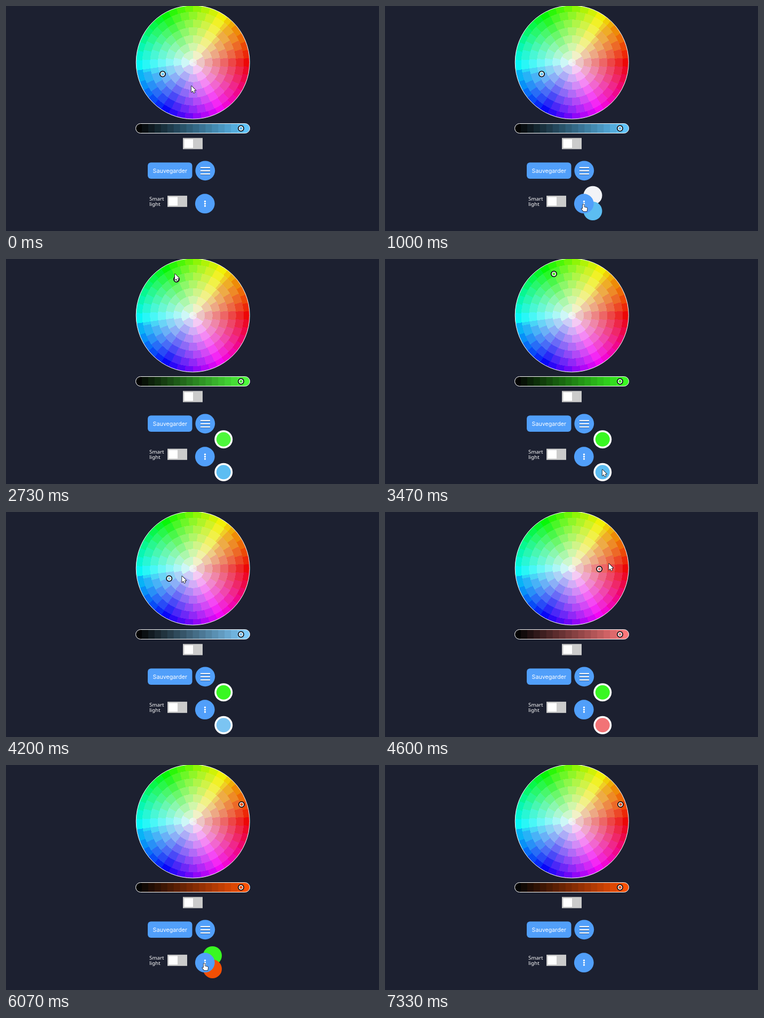
Recreate the animation shown at these times as an HTML page with a canvas. Size 700 by 422 pixels, loop 7390 ms.

```html
<!DOCTYPE html>
<html lang="fr">
<head>
<meta charset="utf-8">
<title>Color picker</title>
<style>
html, body { margin: 0; width: 100%; height: 100%; overflow: hidden; background: #1c2030; }
canvas { display: block; }
</style>
</head>
<body>
<canvas id="stage" width="700" height="422"></canvas>
<script>
const LOOP = 7390;
const ctx = document.getElementById('stage').getContext('2d');
const BLUE = '#519ffa';
const CX = 350.7, CY = 105.5, R = 106.5;
const OPEN_AT = 880, CLOSE_AT = 5930, LAG = 100;

// Pointer path: time, x, y, linear segment up to this point
const PATH = [
  [0, 348, 150], [80, 348, 150], [680, 372, 372], [1500, 373, 372],
  [1800, 385, 310], [2010, 407, 338], [2230, 407, 338], [2450, 350, 105],
  [2630, 320, 38, 1], [2720, 317, 28, 1], [2860, 317, 28], [3200, 408, 395],
  [3700, 408, 395], [4050, 294, 127], [4500, 402, 107, 1], [4600, 420, 97, 1],
  [4800, 442, 74, 1], [5150, 442, 74], [5850, 372, 372], [6450, 372, 372],
  [7220, 543, 424]
];

const clamp = (v, a, b) => Math.min(b, Math.max(a, v));
const smooth = u => u * u * (3 - 2 * u);

function pointer(t) {
  const i = PATH.findIndex(p => p[0] > t);
  if (i < 0) return PATH[PATH.length - 1].slice(1, 3);
  const a = PATH[i - 1], b = PATH[i];
  let u = (t - a[0]) / (b[0] - a[0]);
  if (!b[3]) u = smooth(u);
  return [a[1] + (b[1] - a[1]) * u, a[2] + (b[2] - a[2]) * u];
}

function hsv(h, s, v) {
  const channel = n => {
    const k = (n + h / 60 + 12) % 6;
    return Math.round(255 * v * (1 - s * clamp(Math.min(k, 4 - k), 0, 1)));
  };
  return [channel(5), channel(3), channel(1)];
}

const css = c => `rgb(${c.join()})`;

function colorAt([x, y], v) {
  const dx = x - CX, dy = CY - y;
  const hue = (Math.atan2(dy, dx) * 180 / Math.PI + 360) % 360;
  return hsv(hue, Math.min(1, Math.hypot(dx, dy) / 98), v);
}

// Wheel made of rings, each ring holding six more cells than the one inside
function makeWheel() {
  const c = document.createElement('canvas');
  c.width = c.height = 216;
  const g = c.getContext('2d');
  const img = g.createImageData(216, 216);
  const edge = (h, at) => {
    const d = h - at;
    return 5 * Math.sign(d) * Math.exp(-Math.abs(d) / 10);
  };
  for (let y = 0; y < 216; y++) {
    for (let x = 0; x < 216; x++) {
      const dx = x - 107.5, dy = 107.5 - y;
      const ring = Math.min(7, Math.round(Math.hypot(dx, dy) / 107 * 7.3));
      let h = (Math.atan2(dy, dx) * 180 / Math.PI + 360) % 360;
      h += edge(h, 47) + edge(h, 188);
      const step = 60 / Math.max(1, ring);
      h = Math.round(h / step) * step % 360;
      const v = 0.97 - 0.04 * Math.max(0, Math.cos((h - 10) * Math.PI / 180));
      const rgb = hsv(h, 0.04 + 0.93 * ring / 7, v);
      img.data.set([...rgb, 255], (y * 216 + x) * 4);
    }
  }
  g.putImageData(img, 0, 0);
  return c;
}
const wheel = makeWheel();

function disc(x, y, r, fill) {
  ctx.beginPath();
  ctx.arc(x, y, r, 0, Math.PI * 2);
  ctx.fillStyle = fill;
  ctx.fill();
}

function ring(x, y, r, width, color) {
  ctx.beginPath();
  ctx.arc(x, y, r, 0, Math.PI * 2);
  ctx.lineWidth = width;
  ctx.strokeStyle = color;
  ctx.stroke();
}

function rect(x, y, w, h, fill) {
  ctx.fillStyle = fill;
  ctx.fillRect(x, y, w, h);
}

function round(x, y, w, h, r) {
  ctx.beginPath();
  ctx.roundRect(x, y, w, h, r);
}

function text(s, x, y, font, align) {
  ctx.font = font;
  ctx.textAlign = align;
  ctx.fillStyle = '#fff';
  ctx.fillText(s, x, y);
}

function handle(x, y) {
  ring(x, y, 5, 2, '#0b0d12');
  ring(x, y, 3.5, 1.5, '#fff');
}

function toggle(x, y) {
  rect(x, y, 37, 21, '#cbcbcb');
  rect(x + 2.5, y + 2.5, 16.5, 16, '#fff');
}

function drawWheel(pos) {
  ctx.save();
  ctx.beginPath();
  ctx.arc(CX, CY, R, 0, Math.PI * 2);
  ctx.clip();
  ctx.drawImage(wheel, Math.round(CX - 108), Math.round(CY - 108));
  ctx.restore();
  ring(CX, CY, R, 1, '#fff');
  handle(...pos);
}

function drawSlider(pos) {
  const full = colorAt(pos, 1);
  const bands = 18, w = 215 / bands;
  ctx.save();
  round(243.5, 220.5, 214, 18, 9);
  ctx.clip();
  for (let i = 0; i < bands; i++) {
    const k = i / (bands - 1);
    rect(243 + i * w, 220, w + 1, 19, css(full.map(c => Math.round(c * k * 0.98 + 4 * (1 - k)))));
  }
  ctx.restore();
  round(243.5, 220.5, 214, 18, 9);
  ctx.lineWidth = 1;
  ctx.strokeStyle = '#fff';
  ctx.stroke();
  handle(441, 229.5);
}

function drawOption(dx, dy, p, color) {
  if (p <= 0) return;
  const x = 373.3 + dx * p, y = 370.7 + dy * p;
  const border = 3.5 * clamp(p * 2 - 1, 0, 1);
  const r = 18 - p;
  if (border > 0) disc(x, y, r, '#fff');
  disc(x, y, r - border, color);
}

function drawButtons() {
  round(266, 293.5, 83.5, 30.5, 6);
  ctx.fillStyle = BLUE;
  ctx.fill();
  text('Sauvegarder', 307.8, 313, '10.7px Inter, sans-serif', 'center');
  disc(373.8, 308.8, 18.4, BLUE);
  for (const y of [302, 308, 314]) {
    rect(365, y + 1.6, 18, 1.4, '#2c5f9e');
    rect(365, y, 18, 2, '#fff');
  }
  text('Smart', 269, 365, '9.8px "Noto Sans", sans-serif', 'left');
  text('light', 269, 374.5, '9.8px "Noto Sans", sans-serif', 'left');
}

function drawMenu() {
  disc(373.3, 370.7, 18.4, BLUE);
  for (const y of [366.5, 370.7, 375]) disc(373.5, y, 1.7, '#fff');
}

const ARROW = new Path2D('M0 0V11.5L2.7 9L4.4 13L6.4 12.1L4.7 8.3H8.2Z');
const HAND = new Path2D('M-1.2 1Q0 -.8 1.2 1V5L6 6.2Q7.4 6.8 7.2 8.3L6.3 13H0L-3.6 8.6Q-3.6 7 -1.2 8.2Z');

function drawPointer(t) {
  if (t > 7230) return;
  const [x, y] = pointer(t);
  const overMenu = Math.hypot(x - 373.3, y - 370.7) < 18;
  const shape = overMenu ? HAND : ARROW;
  ctx.save();
  ctx.translate(x, y);
  ctx.lineWidth = 1.6;
  ctx.lineJoin = 'round';
  ctx.strokeStyle = '#15171f';
  ctx.stroke(shape);
  ctx.fillStyle = '#fff';
  ctx.fill(shape);
  ctx.restore();
}

const drag = (t, from, to) => pointer(clamp(t - LAG, from, to));

function draw(t) {
  const first = t < 2450 ? [CX, CY] : drag(t, 2450, 2720);
  const second = t < 4050 ? [294, 127.5] : drag(t, 4050, 4800);
  const active = t >= 2180 && t < 3620 ? first : second;
  const p = smooth(clamp((t - OPEN_AT) / 250, 0, 1)) - smooth(clamp((t - CLOSE_AT) / 250, 0, 1));

  rect(0, 0, 700, 422, '#1c2030');
  drawWheel(active);
  drawSlider(active);
  toggle(332, 247.5);
  toggle(303, 355.8);
  drawButtons();
  drawOption(35, -32.5, p, t < 2450 ? '#f2f3f7' : css(colorAt(first, 0.97)));
  drawOption(35, 29, p, css(colorAt(second, 0.95)));
  drawMenu();
  drawPointer(t);
}

const start = performance.now();
function frame() {
  draw((performance.now() - start) % LOOP);
  requestAnimationFrame(frame);
}
frame();
</script>
</body>
</html>
```
